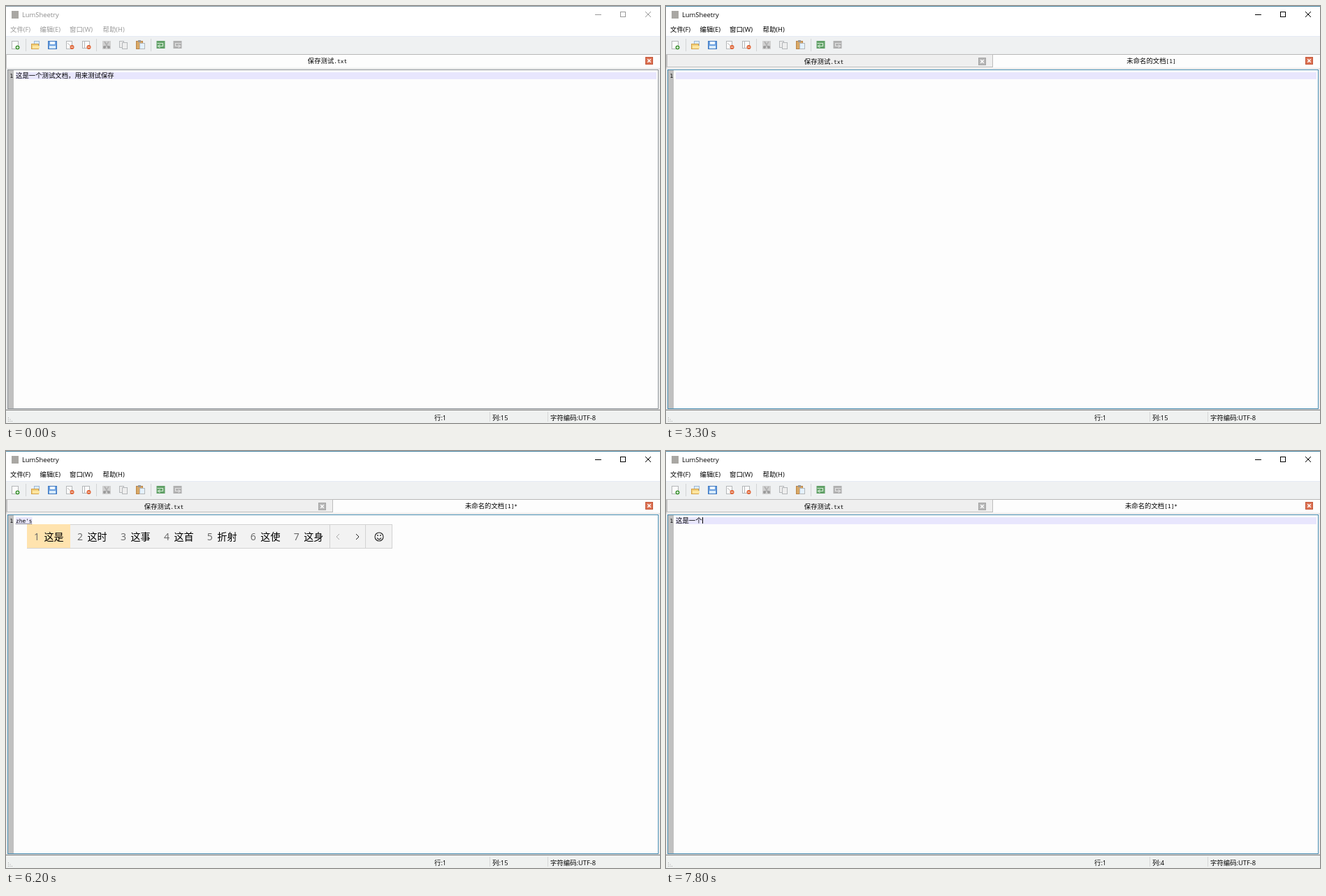
Write an HTML page with a canvas that moves like this. It is 936x598 px and loops after 8000 ms.

```html
<!DOCTYPE html>
<html lang="zh-CN">
<head>
<meta charset="utf-8">
<title>LumSheetry</title>
<style>
html, body { margin: 0; width: 100%; height: 100%; overflow: hidden; background: #fff; }
canvas { display: block; }
</style>
</head>
<body>
<canvas id="stage" width="936" height="598"></canvas>
<script>
const g = document.getElementById('stage').getContext('2d');
const CJK = '"Noto Sans CJK SC", "Noto Sans CJK", sans-serif';
const UI = `9.4px "Open Sans", ${CJK}`;
const MONO = '7.8px "DejaVu Sans Mono", monospace';
const WIDE = `9.4px ${CJK}`;

// Each entry changes part of the state from its time (ms) onwards.
const steps = [
  [0, { text: '这是一个测试文档，用来测试保存', typed: '', words: '', col: 15, tabs: 1 }],
  [900, { hover: 1 }],
  [1700, { active: true, hover: 2, caret: true }],
  [1800, { hover: 1, tabs: 2, text: '' }],
  [2300, { hover: 0, tabHover: true, caret: false }],
  [2400, { tabHover: false }],
  [2800, { caret: true }],
  [3300, { caret: false }],
  [3700, { caret: true }],
  [4200, { caret: false }],
  [4700, { caret: true }],
  [5200, { caret: false }],
  [5400, { typed: 'z', words: '在中这再最做着' }],
  [5500, { typed: 'zh', words: '这中种只找张着', dirty: true }],
  [5700, { typed: 'zhe', words: '这者折哲浙遮着' }],
  [6200, { typed: "zhe's", words: '这是 这时 这事 这首 折射 这使 这身' }],
  [6300, { typed: "zhe'sh" }],
  [6400, { typed: "zhe'shi", words: '这是 这时 这事 这使 这世 这市 折实' }],
  [6600, { typed: '', text: '这是', col: 2, caret: true, fade: 0.4 }],
  [6700, { words: '', fade: 1 }],
  [7100, { caret: false }],
  [7400, { typed: 'y', words: '有一要也与用以' }],
  [7500, { typed: 'yi', words: '一以已亿易意依' }],
  [7600, { typed: "yi'ge", words: '一个 一格 一各 一隔 易割 一歌 以个' }],
  [7700, { typed: '', text: '这是一个', col: 4, caret: true, fade: 0.4 }],
  [7800, { words: '', fade: 1 }]
];

function box(x, y, w, h, fill, line) {
  if (fill) { g.fillStyle = fill; g.fillRect(x, y, w, h); }
  if (line) { g.lineWidth = 1; g.strokeStyle = line; g.strokeRect(x + .5, y + .5, w - 1, h - 1); }
}

function path(points, color, width = 1) {
  g.beginPath();
  for (let i = 0; i < points.length; i += 2) g.lineTo(points[i], points[i + 1]);
  g.strokeStyle = color;
  g.lineWidth = width;
  g.stroke();
}

function dot(x, y, r, color) {
  g.fillStyle = color;
  g.beginPath();
  g.arc(x, y, r, 0, 7);
  g.fill();
}

function arc(x, y, r, from, to) {
  g.strokeStyle = '#222';
  g.lineWidth = 1.1;
  g.beginPath();
  g.arc(x, y, r, from, to);
  g.stroke();
}

function label(s, x, y, color = '#000', font = UI) {
  g.font = font;
  g.fillStyle = color;
  g.fillText(s, x, y);
}

// Half-width and full-width runs share one line; returns its width.
function mixed(s, x, y, draw = true) {
  let w = 0;
  for (const run of s.match(/[ -~]+|[^ -~]+/g) || []) {
    g.font = run[0] <= '~' ? MONO : WIDE;
    g.fillStyle = '#000';
    if (draw) g.fillText(run, x + w, y);
    w += g.measureText(run).width;
  }
  return w;
}

const widthOf = s => mixed(s, 0, 0, false);

function centered(s, x, y) { mixed(s, x - widthOf(s) / 2, y); }

function cross(x, y, r, color, width) {
  path([x - r, y - r, x + r, y + r], color, width);
  path([x - r, y + r, x + r, y - r], color, width);
}

function closeBox(x, y, color, edge) {
  box(x, y, 11, 11, color, edge);
  cross(x + 5.5, y + 5.5, 2.2, '#fff', 1.5);
}

function page(x, y, w = 8, h = 11, fill = '#fbfbfb') {
  box(x, y, w, h, fill, '#b4b7b9');
}

function badge(x, y, color) {
  dot(x, y, 3, color);
  path([x - 1.7, y, x + 1.7, y], '#fff');
}

function arrow(x, flip, color, shine) {
  g.save();
  g.translate(x, 56);
  g.scale(flip, 1);
  box(-6, -6, 12, 11, color);
  path([-5, -2.5, 3, -2.5, 3, 1.5, -2, 1.5], shine, 1.2);
  path([-1, -.5, -4, 1.5, -1, 3.5], shine, 1.2);
  g.restore();
}

function toolbar(s) {
  box(0, 43, 936, 26, '#eff1f2');
  box(0, 43, 936, 1, '#e6ebf5');
  for (const x of [28, 129, 207]) box(x, 47, 1, 18, '#d3d5d6');
  if (s.hover) box(1, 44, 25, 23, s.hover > 1 ? '#bfddf5' : '#d4e8f8', '#9ccbee');

  const n = s.hover > 1 ? 9 : 8;
  page(n, 50, 10, 12);
  dot(n + 8.5, 59.5, 3, '#4d9c43');
  path([n + 7, 59.5, n + 10, 59.5], '#fff');
  path([n + 8.5, 58, n + 8.5, 61], '#fff');

  box(40, 50, 8, 8, '#dcecfb', '#9db8d6');
  box(36, 54, 11, 8, '#f0cd78', '#d3a24a');
  box(38, 57, 10, 4, '#ffe6a0');

  box(60, 50, 13, 12, '#6ba0e0', '#3f78c0');
  box(63, 51, 7, 4, '#eef6fd');
  box(62, 57, 9, 4, '#d8ebfa');

  page(86, 50, 9, 12);
  path([88, 53, 92, 57], '#bbb');
  badge(94.5, 59, '#df6232');

  page(109, 50, 6, 11);
  page(112, 50, 8, 11);
  badge(118.5, 59, '#df6232');

  box(138, 50, 12, 12, '#d0d0d0');
  path([141, 51, 146, 59], '#aaa', 1.5);
  path([147, 51, 142, 59], '#b4b4b4', 1.5);
  dot(141, 59, 2, '#999');
  dot(147, 59, 2, '#999');

  page(162, 50, 7, 10, '#eee');
  page(166, 52, 8, 10, '#eee');

  box(186, 50, 10, 12, '#d9a865', '#b98548');
  box(189, 49, 4, 3, '#999');
  page(191, 53, 8, 9, '#e4f1fc');

  arrow(221.5, 1, '#62a168', '#d2ead2');
  arrow(245.5, -1, '#b0b0b0', '#e2e2e2');
}

function titleBar(s) {
  const ink = s.active ? '#000' : '#999';
  box(0, 0, 936, 43, '#fff');
  box(0, 0, 936, 1, s.active ? '#4a86a3' : '#8295a0');
  box(8, 7, 10, 11, '#a9a7a3');
  label('LumSheetry', 23, 16, s.active ? '#000' : '#8c8c8c');
  ['文件(F)', '编辑(E)', '窗口(W)', '帮助(H)'].forEach((m, i) =>
    label(m, [6, 48.5, 91, 138.5][i], 37, ink));
  box(843, 12, 9, 1, ink);
  box(879, 8, 8, 8, null, ink);
  cross(919, 12, 4, ink);
}

function tabBar(s) {
  box(0, 69, 936, 20, '#fdfdfd');
  box(0, 69, 936, 1, '#b8b8b8');
  box(0, 69, 1, 20, '#c4c4c4');
  if (s.tabs > 1) {
    box(1, 69, 467, 19, s.tabHover ? '#e2eff9' : '#efefef', '#bdbdbd');
    centered('保存测试.txt', 226, 82.5);
    closeBox(447, 74, '#b7b7b7', '#a5a5a5');
    centered('未命名的文档[1]' + (s.dirty ? '*' : ''), 694.5, 82);
  } else {
    centered('保存测试.txt', 460, 82);
  }
  closeBox(915, 73, '#dc7355', '#c45537');
}

function editor(s) {
  box(0, 89, 936, 490, '#fdfdfd', '#dcdcdc');
  box(2, 91, 932, 487, '#fdfdfd', s.active ? '#4186ab' : '#858b90');
  box(3, 92, 8, 485, '#c0c0c0');
  label('1', 5.5, 103, '#000', MONO);

  const start = 14 + widthOf(s.text);
  const end = start + widthOf(s.typed);
  box(14, 95, s.typed ? end - 14 : 917, 10, '#e8e6fd');
  mixed(s.text + s.typed, 14, 103);
  if (s.typed) {
    for (let x = start; x < end; x += 2) box(x, 104, 1, 1, '#333');
  } else if (s.caret) {
    box(Math.round(start), 95, 1, 9, '#000');
  }
}

function statusBar(s) {
  box(0, 579, 936, 19, '#eff1f0');
  box(0, 579, 936, 1, '#858585');
  box(692, 582, 1, 14, '#d8d8d8');
  box(775, 582, 1, 14, '#d8d8d8');
  label('行:1', 613, 593.5);
  label('列:' + s.col, 696, 593.5);
  label('字符编码:UTF-8', 779, 593.5);
  for (let r = 0; r < 3; r++)
    for (let c = 0; c <= r; c++) box(3 + c * 2.5, 590 + r * 2.5, 1, 1, '#aaa');
}

function candidates(s) {
  if (!s.words) return;
  const words = s.words.includes(' ') ? s.words.split(' ') : [...s.words];
  const pitch = 33.7 + 14.13 * words[0].length;
  const end = Math.round(30 + pitch * words.length);
  const font = `14.1px "Open Sans", ${CJK}`;
  g.globalAlpha = s.fade || 1;
  box(30, 105, end + 59, 35, null);
  box(30, 105, end + 89 - 30, 35, '#f2f2f2', '#d2d2d2');
  box(30, 105, Math.round(pitch), 34, '#ffe3ae');
  words.forEach((word, i) => {
    const x = 30 + pitch * i;
    label(i + 1, x + 10, 128, '#666', font);
    label(word, x + 24.5, 128, '#000', font);
  });
  for (const x of [end - 1, end + 50]) box(x, 106, 1, 33, '#d2d2d2');
  path([end + 13, 119, end + 9, 123, end + 13, 127], '#aaa');
  path([end + 37, 119, end + 41, 123, end + 37, 127], '#222');

  const face = end + 70;
  arc(face, 123, 6, 0, 7);
  arc(face, 123.5, 3, .3, 2.84);
  dot(face - 2, 121, .9, '#222');
  dot(face + 2, 121, .9, '#222');
  g.globalAlpha = 1;
}

const begin = performance.now();
function frame() {
  const t = (performance.now() - begin) % 8000;
  const s = {};
  for (const [at, change] of steps) if (t >= at) Object.assign(s, change);
  for (const part of [titleBar, toolbar, tabBar, editor, statusBar, candidates]) part(s);
  requestAnimationFrame(frame);
}
frame();
</script>
</body>
</html>
```
